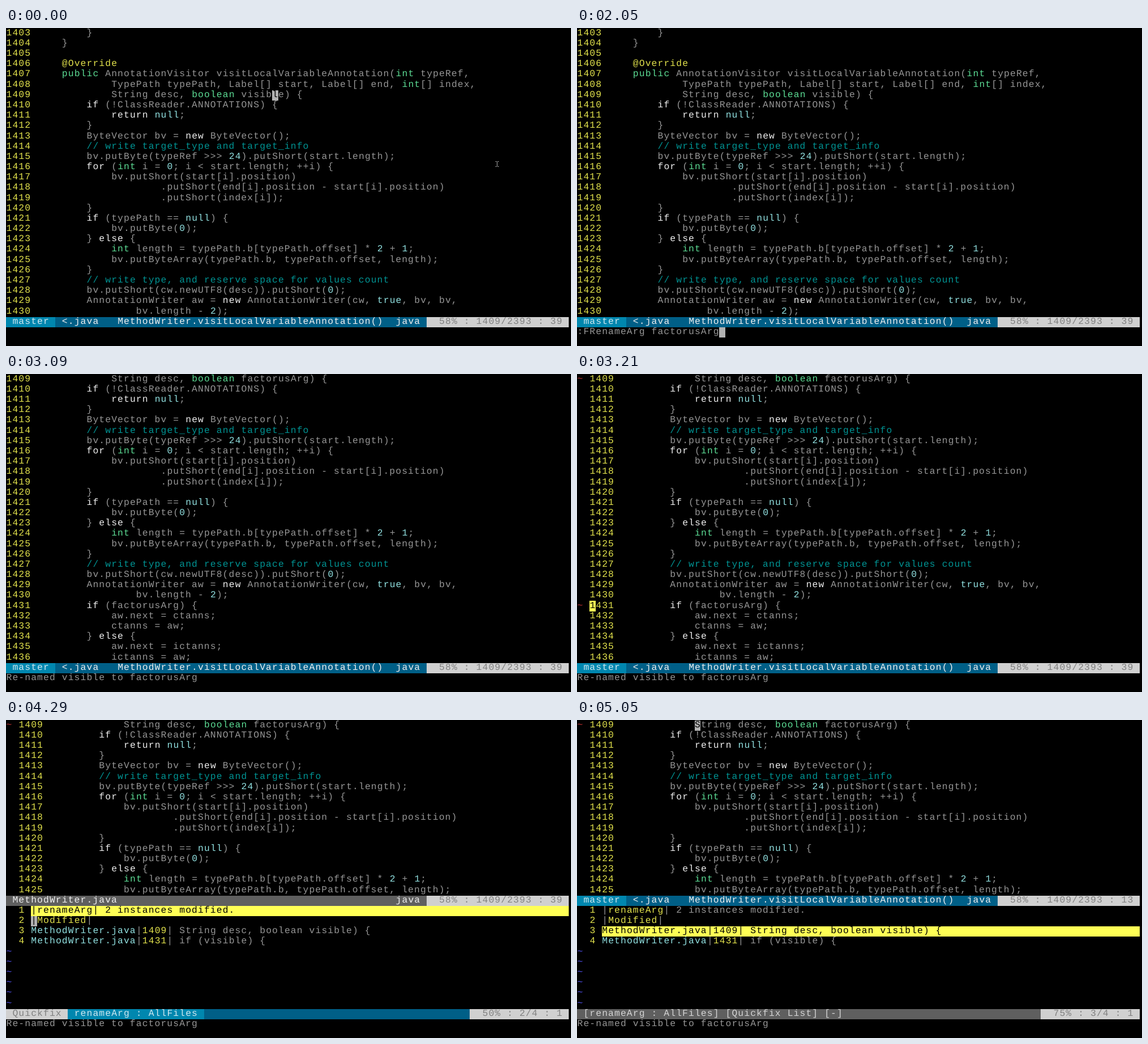
An HTML page that plays this animation: 998x561 px, repeating every 9.92 s.

```html
<!DOCTYPE html>
<html lang="en">
<head>
<meta charset="utf-8">
<title>Rename argument in a terminal editor</title>
<style>
  html, body { margin: 0; width: 100%; height: 100%; overflow: hidden; background: #000; }
  .scene {
    position: absolute; left: 0; top: 0; width: 998px; height: 561px;
    overflow: hidden; visibility: hidden;
    font: 16.4px/17px "Liberation Mono", "Courier New", monospace;
    letter-spacing: 1.08px;
    text-rendering: geometricPrecision;
    font-variant-ligatures: none;
  }
  .scene.on { visibility: visible; }
  .scene span, .scene i, .scene svg { position: absolute; white-space: pre; }
  .scene span { margin: -0.3px 0 0 0.54px; }
</style>
</head>
<body>
<script>
const CW = 10.922, RH = 18.18, LOOP = 9920, COLS = 91;
const C = {
  text: '#969696', num: '#e2e24c', type: '#5cdc94', key: '#f0f0f0', lit: '#92e2e2',
  note: '#009494', sign: '#c03030', tilde: '#5050f0', black: '#000', cursor: '#b2b2b2',
  teal: '#0087af', blue: '#005f87', light: '#d0d0d0', dim: '#808080', idle: '#5f5f5f',
  pale: '#d0e8f0', white: '#f0f0f0', silver: '#d4d4d4', yellow: '#ffff55', cyan: '#a6ffff'
};
const FIRST = 1403;
const CODE = `        }
    }

    @Override
    public AnnotationVisitor visitLocalVariableAnnotation(int typeRef,
            TypePath typePath, Label[] start, Label[] end, int[] index,
            String desc, boolean visible) {
        if (!ClassReader.ANNOTATIONS) {
            return null;
        }
        ByteVector bv = new ByteVector();
        // write target_type and target_info
        bv.putByte(typeRef >>> 24).putShort(start.length);
        for (int i = 0; i < start.length; ++i) {
            bv.putShort(start[i].position)
                    .putShort(end[i].position - start[i].position)
                    .putShort(index[i]);
        }
        if (typePath == null) {
            bv.putByte(0);
        } else {
            int length = typePath.b[typePath.offset] * 2 + 1;
            bv.putByteArray(typePath.b, typePath.offset, length);
        }
        // write type, and reserve space for values count
        bv.putShort(cw.newUTF8(desc)).putShort(0);
        AnnotationWriter aw = new AnnotationWriter(cw, true, bv, bv,
                bv.length - 2);
        if (visible) {
            aw.next = ctanns;
            ctanns = aw;
        } else {
            aw.next = ictanns;
            ictanns = aw;`.split('\n');
const TOKENS = /(\/\/.*)|(@\w+)|\b(public|int|boolean)\b|\b(if|for|return|new|else)\b|\b(null|true|\d+)\b/g;
const TOKEN_COLORS = [C.note, C.num, C.type, C.key, C.lit];
const FILE = 'MethodWriter.java';
const METHOD = 'MethodWriter.visitLocalVariableAnnotation()';
const MESSAGE = 'Re-named visible to factorusArg';

let scene;

function text(row, col, str, color = C.text) {
  const el = document.createElement('span');
  el.textContent = str;
  el.style.cssText = `left:${col * CW}px;top:${row * RH}px;color:${color}`;
  scene.append(el);
}

function box(row, col, end, color) {
  const el = document.createElement('i');
  const x = Math.round(col * CW), y = Math.round(row * RH + 0.5);
  const w = Math.round(end * CW) - x, h = Math.round((row + 1) * RH + 0.5) - y;
  el.style.cssText = `left:${x}px;top:${y}px;width:${w}px;height:${h}px;background:${color}`;
  scene.append(el);
}

function cursor(row, col, char = '', color = C.cursor, ink = C.black) {
  box(row, col, col + 1, color);
  text(row, col, char, ink);
}

function codeLine(row, col, str) {
  let at = 0;
  for (const m of str.matchAll(TOKENS)) {
    text(row, col + at, str.slice(at, m.index));
    text(row, col + m.index, m[0], TOKEN_COLORS[m.slice(1).findIndex(Boolean)]);
    at = m.index + m[0].length;
  }
  text(row, col + at, str.slice(at));
}

function code(from, rows, { signs = false, renamed = false } = {}) {
  const left = signs ? 2 : 0;
  for (let r = 0; r < rows; r++) {
    const n = from + r;
    const str = CODE[n - FIRST];
    if (signs && (n === 1409 || n === 1431)) text(r, 0, '~', C.sign);
    text(r, left, String(n), C.num);
    codeLine(r, left + 5, renamed ? str.replace('visible', 'factorusArg') : str);
  }
}

function position(row, col, str) {
  box(row, col, COLS, C.light);
  text(row, col + 2, str, C.dim);
}

function activeBar(row, column) {
  box(row, 0, 8, C.teal);
  box(row, 8, 68, C.blue);
  text(row, 1, 'master', C.pale);
  text(row, 9, '<.java', C.key);
  text(row, 18, METHOD, C.key);
  text(row, 63, 'java', C.key);
  position(row, 68, `58% : 1409/2393 : ${column}`);
}

function idleBar(row) {
  box(row, 0, 68, C.idle);
  text(row, 1, FILE, C.white);
  text(row, 63, 'java', C.white);
  position(row, 68, '58% : 1409/2393 : 39');
}

function quickfix(line, marked, active) {
  const top = 18;
  const rows = [
    ['', 'renameArg', ' 2 instances modified.'],
    ['', 'Modified', ''],
    [FILE, '1409', ' String desc, boolean visible) {'],
    [FILE, '1431', ' if (visible) {']
  ];
  rows.forEach(([file, mark, rest], i) => {
    const r = top + i, hot = i + 1 === marked, end = 5 + file.length + mark.length;
    const ink = color => hot ? C.black : color;
    if (hot) box(r, 4, COLS, C.yellow);
    text(r, 2, String(i + 1), C.num);
    text(r, 4, file, ink(C.lit));
    text(r, 4 + file.length, '|', ink(C.text));
    text(r, 5 + file.length, mark, ink(C.num));
    text(r, end, '|' + rest, ink(C.text));
  });
  for (let r = 22; r < 28; r++) text(r, 0, '~', C.tilde);

  if (active) {
    box(28, 0, 10, C.light);
    box(28, 10, 32, C.teal);
    box(28, 32, 75, C.blue);
    text(28, 1, 'Quickfix', C.dim);
    text(28, 11, 'renameArg : AllFiles', C.pale);
  } else {
    box(28, 0, 75, C.idle);
    text(28, 1, '[renameArg : AllFiles] [Quickfix List] [-]', C.silver);
  }
  position(28, 75, `${line * 25}% : ${line}/4 : 1`);
}

function pointer() {
  scene.insertAdjacentHTML('beforeend',
    `<svg style="left:863px;top:234px" width="9" height="12" fill="none" stroke="#aaa">
      <path d="M1.5 1.5h2l1 1 1-1h2M4.5 2v8M1.5 10.5h2l1-1 1 1h2"/></svg>`);
}

function before() {
  code(1403, 28);
  activeBar(28, 39);
}

function typing(str) {
  before();
  text(29, 0, str);
  cursor(29, str.length);
}

function after(signs) {
  code(1409, 28, { signs, renamed: true });
  activeBar(28, 39);
}

function split() {
  code(1409, 17, { signs: true, renamed: true });
  text(29, 0, MESSAGE);
}

function listStep(line) {
  split();
  idleBar(17);
  quickfix(line, 1, true);
}

const SCENES = [
  [0, () => { before(); cursor(6, 43, 'l'); pointer(); }],
  [1080, () => { before(); cursor(6, 43, 'l'); }],
  [1120, () => typing(':')],
  [1590, () => typing(':F')],
  [2050, () => typing(':FRenameArg factorusArg')],
  [2970, () => after(false)],
  [3090, () => { after(false); text(29, 0, MESSAGE); }],
  [3210, () => { after(true); text(29, 0, MESSAGE); cursor(22, 2, '1', C.yellow); }],
  [3700, () => { listStep(1); cursor(18, 4, '|', C.black, C.num); }],
  [4290, () => { listStep(2); cursor(19, 4, '|'); }],
  [4500, () => { listStep(3); cursor(20, 4, 'M', C.cyan); }],
  [5050, () => {
    split();
    activeBar(17, 13);
    quickfix(3, 3, false);
    cursor(0, 19, 'S');
  }]
];

const layers = SCENES.map(([, draw]) => {
  scene = document.createElement('div');
  scene.className = 'scene';
  draw();
  document.body.append(scene);
  return scene;
});

const start = performance.now();
let shown = -1;

function tick() {
  const t = (performance.now() - start) % LOOP;
  const now = SCENES.findLastIndex(([at]) => t >= at);
  if (now !== shown) {
    layers.forEach((el, i) => el.classList.toggle('on', i === now));
    shown = now;
  }
  requestAnimationFrame(tick);
}
tick();
</script>
</body>
</html>
```
